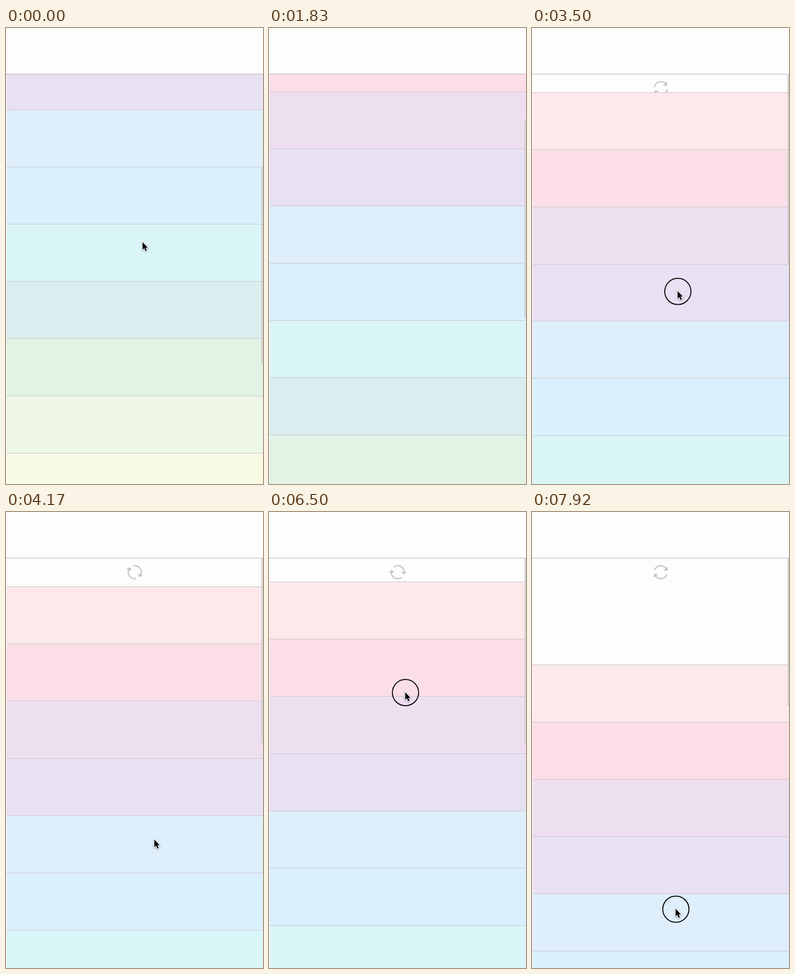
These frames come from a looping animation (480 by 852 pixels, 8000 ms). An HTML page with a canvas:

```html
<!DOCTYPE html>
<html lang="en">
<head>
<meta charset="utf-8">
<title>Pull to refresh</title>
<style>
html, body { margin: 0; width: 100%; height: 100%; overflow: hidden; background: #fdfdfd; }
canvas { display: block; }
</style>
</head>
<body>
<canvas id="stage" width="480" height="852"></canvas>
<script>
const ctx = document.getElementById('stage').getContext('2d');
const W = 480, H = 852, TOP = 86, ROW = 106.88, LOOP = 8000, FPS = 12;
const VIEW = H - TOP, BAR = 0.472, HOLD = 53.3, SLOP = 12;
const PAPER = '#fdfdfd';
const COLORS = ['#fde8ea', '#fbdee7', '#eedff0', '#e8e1f3', '#deeefb', '#daf0fe', '#daf5f8', '#daedef',
  '#e2f2e4', '#eef6e6', '#f8fae3', '#fffbe1', '#fff4de', '#ffefdc', '#ffe5dd'];

const easeIn = power => u => u ** power;
const easeOut = power => u => 1 - (1 - u) ** power;
const decay = (time, tau) => 1 - Math.exp(-time / tau);
const clamp = v => Math.min(1, Math.max(0, v));

// Pointer glides: x runs evenly, y is eased; it rests in between
const GLIDES = [
  { from: 0, to: 1400, x: 298, y: 870, ease: easeIn(2.6) },
  { from: 2540, to: 2920, x: 266, y: 284, ease: easeOut(2) },
  { from: 2920, to: 4000, x: 277, y: 612, ease: easeOut(1.3) },
  { from: 4250, to: 5000, x: 223, y: 432, ease: easeOut(2) },
  { from: 5333, to: 6083, x: 252, y: 239, ease: easeOut(2) },
  { from: 6250, to: LOOP, x: 269, y: 749, ease: easeOut(1.38) }
];
const FLICK = { from: 1080, to: 1400 };
const PULL = { from: 2920, to: 3750 };
const PULL_AGAIN = { from: 6250, to: LOOP };

function pointer(t) {
  let x = 255, y = 400;
  for (const glide of GLIDES) {
    const u = clamp((t - glide.from) / (glide.to - glide.from));
    x += (glide.x - x) * u;
    y += (glide.y - y) * glide.ease(u);
  }
  return { x, y };
}

const during = (t, press) => t >= press.from - 1 && t < press.to;

// The list follows the pointer; past its top edge it resists like a rubber band
function drag(t, press, base) {
  const moved = pointer(Math.min(t, press.to)).y - pointer(press.from).y;
  const raw = base - Math.max(0, moved - SLOP);
  return raw >= 0 ? raw : -VIEW * (1 - 1 / (1 - raw * 0.55 / VIEW));
}

const coast = t => 361.3 + 369.3 * decay(t, 500);
const flicked = t => drag(t, FLICK, coast(FLICK.from));
const thrown = t => flicked(t) - 350 * decay(Math.min(t, 2250) - FLICK.to, 250);
const pulled = t => drag(t, PULL, thrown(PULL.from));

function scrollAt(t) {
  if (t < FLICK.from) return coast(t);
  if (t < FLICK.to) return flicked(t);
  if (t < PULL.from) return thrown(t);
  if (t < PULL.to) return pulled(t);
  if (t < PULL_AGAIN.from) {
    const settle = easeOut(2)(clamp((t - PULL.to) / 400));
    const close = easeOut(2)(clamp((t - 5400) / 350));
    return (pulled(PULL.to) * (1 - settle) - HOLD * settle) * (1 - close);
  }
  return drag(t, PULL_AGAIN, 0);
}

function drawSpinner(t) {
  const upright = t < PULL_AGAIN.from ? PULL.from + 580 : 7820;
  ctx.save();
  ctx.translate(240.5, 112.5);
  ctx.rotate((t - upright - (t < PULL_AGAIN.from ? 0 : 0)) * 0.104 * Math.PI / 180);
  ctx.strokeStyle = ctx.fillStyle = '#c5c5c7';
  ctx.lineWidth = 2.3;
  for (let i = 0; i < 2; i++) {
    ctx.beginPath();
    ctx.arc(0, 0, 12.2, -2.98, -0.72);
    ctx.stroke();
    ctx.beginPath();
    ctx.moveTo(11.6, -12.2);
    ctx.lineTo(11.6, -4.6);
    ctx.lineTo(4, -4.6);
    ctx.fill();
    ctx.rotate(Math.PI);
  }
  ctx.restore();
}

function drawRows(scroll) {
  COLORS.forEach((color, i) => {
    const y = Math.round(TOP - scroll + i * ROW);
    ctx.fillStyle = color;
    ctx.fillRect(1, y, W, Math.ceil(ROW));
    ctx.fillStyle = '#c8c8ca';
    ctx.fillRect(1, y, W, 1);
  });
}

function drawBar(scroll) {
  ctx.beginPath();
  ctx.roundRect(478, TOP + 1 + Math.max(0, scroll) * BAR, 6, 369 + Math.min(0, scroll) * BAR, 3);
  ctx.fillStyle = '#e0e0e2';
  ctx.fill();
  ctx.lineWidth = 1.2;
  ctx.strokeStyle = '#c0c0c2';
  ctx.stroke();
}

const ARROW = new Path2D('M0 0V14.2L3.2 11.3L5.6 16.8L8 15.8L5.7 10.4H9.9Z');

function drawPointer({ x, y }, pressed) {
  ctx.save();
  ctx.translate(x, y);
  if (pressed) {
    ctx.beginPath();
    ctx.arc(0.5, 0.7, 24.5, 0, 2 * Math.PI);
    ctx.lineWidth = 1.8;
    ctx.strokeStyle = '#000';
    ctx.stroke();
  }
  ctx.lineWidth = 2;
  ctx.strokeStyle = '#fff';
  ctx.shadowColor = 'rgba(0,0,0,.4)';
  ctx.shadowBlur = 3;
  ctx.shadowOffsetY = 1;
  ctx.stroke(ARROW);
  ctx.shadowColor = 'transparent';
  ctx.fillStyle = '#000';
  ctx.fill(ARROW);
  ctx.restore();
}

function draw(t) {
  const scroll = scrollAt(t);
  const idle = (t > 2240 && t < PULL.from) || (t > 5830 && t < PULL_AGAIN.from - 1);
  ctx.fillStyle = PAPER;
  ctx.fillRect(0, 0, W, H);
  if (scroll < 0) drawSpinner(t);
  drawRows(scroll);
  if (!idle) drawBar(scroll);
  ctx.fillStyle = PAPER;
  ctx.fillRect(0, 0, W, TOP);
  ctx.fillStyle = '#bbbbbd';
  ctx.fillRect(0, TOP - 0.5, W, 1.2);
  drawPointer(pointer(t), [FLICK, PULL, PULL_AGAIN].some(press => during(t, press)));
}

let begin;
function tick(now) {
  begin ??= now;
  const t = (now - begin) % LOOP;
  // The picture advances twelve times a second
  draw(Math.floor((t + 4) * FPS / 1000) * 1000 / FPS % LOOP);
  requestAnimationFrame(tick);
}
requestAnimationFrame(tick);
</script>
</body>
</html>
```
